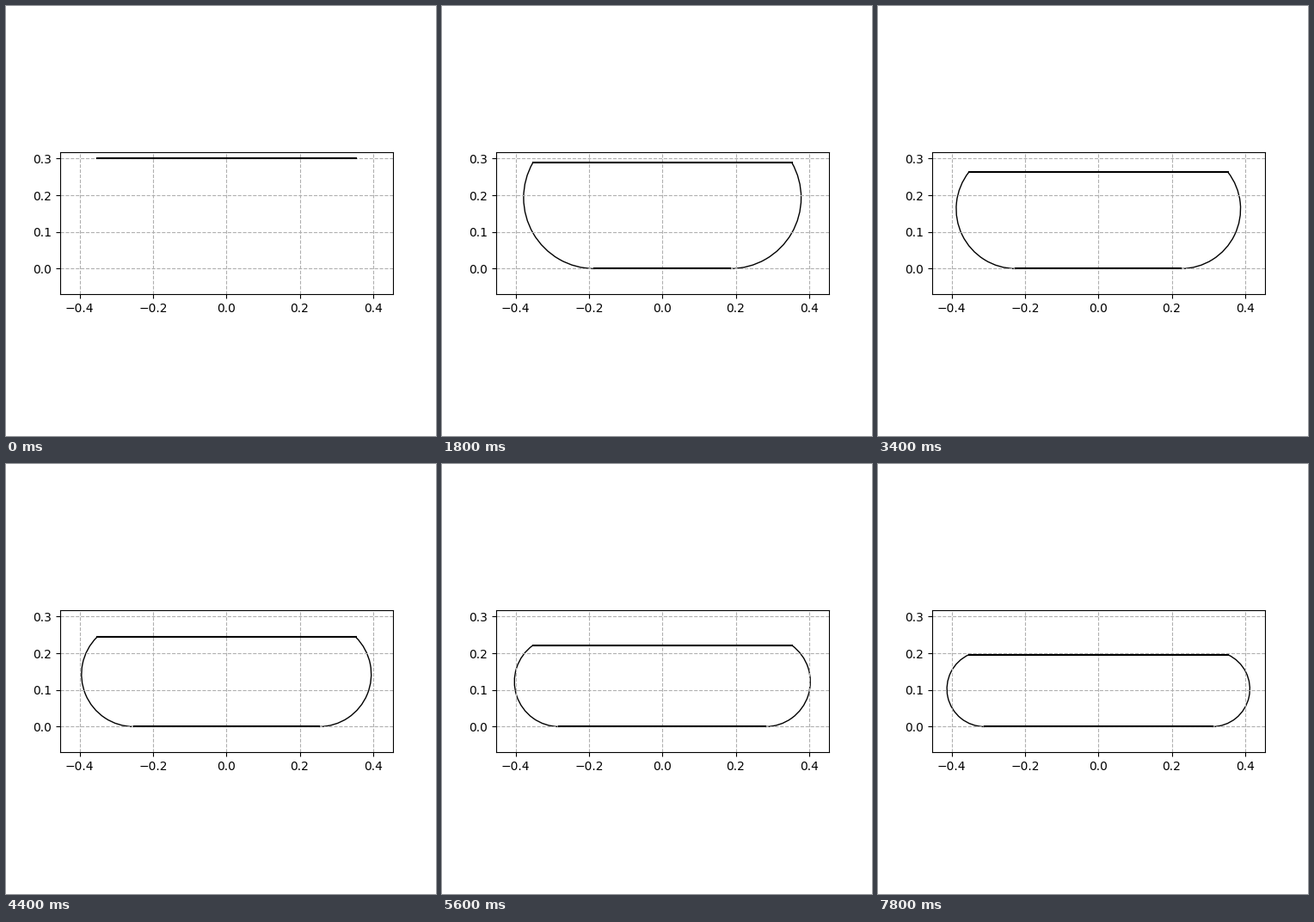
A matplotlib script that plays this animation: 500 by 500 pixels, repeating every 8 s.

```python
import numpy as np
import matplotlib.pyplot as plt
from matplotlib.animation import FuncAnimation
from matplotlib.patches import Arc

FRAMES, INTERVAL = 40, 200
HALF = 0.353              # half width of the platform
LENGTH = 3 * np.pi / 16   # half of the membrane length
TOP = 0.3
PRESSURE, MASS, G, DT = 2000, 100, 9.81, 0.01


def shape(y):
    """Contact half width, side radius and wrap angle for platform height y."""
    lo, hi = 0.5, np.pi
    for _ in range(50):
        phi = (lo + hi) / 2
        if y * (phi - np.sin(phi)) / (1 - np.cos(phi)) < LENGTH - HALF:
            lo = phi
        else:
            hi = phi
    r = y / (1 - np.cos(phi))
    return HALF - r * np.sin(phi), r, phi


def fall(steps):
    y, v = TOP, 0.0
    heights = [y]
    for _ in range(steps):
        x = shape(y)[0]
        v += (PRESSURE * 2 * x / MASS - G) * DT
        y += v * DT
        heights.append(y)
    return heights


heights = fall(FRAMES - 2)

fig, ax = plt.subplots(figsize=(5, 5), dpi=100)
ax.set_aspect("equal")
ax.set_xlim(-0.4544, 0.4544)
ax.set_ylim(-0.0694, 0.3176)
ax.set_xticks([-0.4, -0.2, 0, 0.2, 0.4])
ax.set_yticks([0, 0.1, 0.2, 0.3])
ax.grid(linestyle="--")

platform, = ax.plot([-HALF, HALF], [TOP, TOP], "k", lw=1.5)
floor, = ax.plot([], [], "k", lw=1.5)
sides = [ax.add_patch(Arc((0, 0), 1, 1, lw=1, color="k", visible=False))
         for _ in range(2)]


def update(i):
    y = heights[max(i - 1, 0)]
    x, r, phi = shape(y)
    platform.set_ydata([y, y])
    floor.set_data([-x, x], [0, 0])
    floor.set_visible(i > 0)
    deg = np.degrees(phi)
    spans = [(-x, 270 - deg, 270), (x, 270, 270 + deg)]
    for arc, (cx, start, end) in zip(sides, spans):
        arc.set_center((cx, r))
        arc.set_width(2 * r)
        arc.set_height(2 * r)
        arc.theta1, arc.theta2 = start, end
        arc.set_visible(i > 0)
    return platform, floor, *sides


def reset():
    return update(0)


anim = FuncAnimation(fig, update, frames=FRAMES, init_func=reset,
                     interval=INTERVAL, repeat=True, repeat_delay=0)
plt.show()
```
